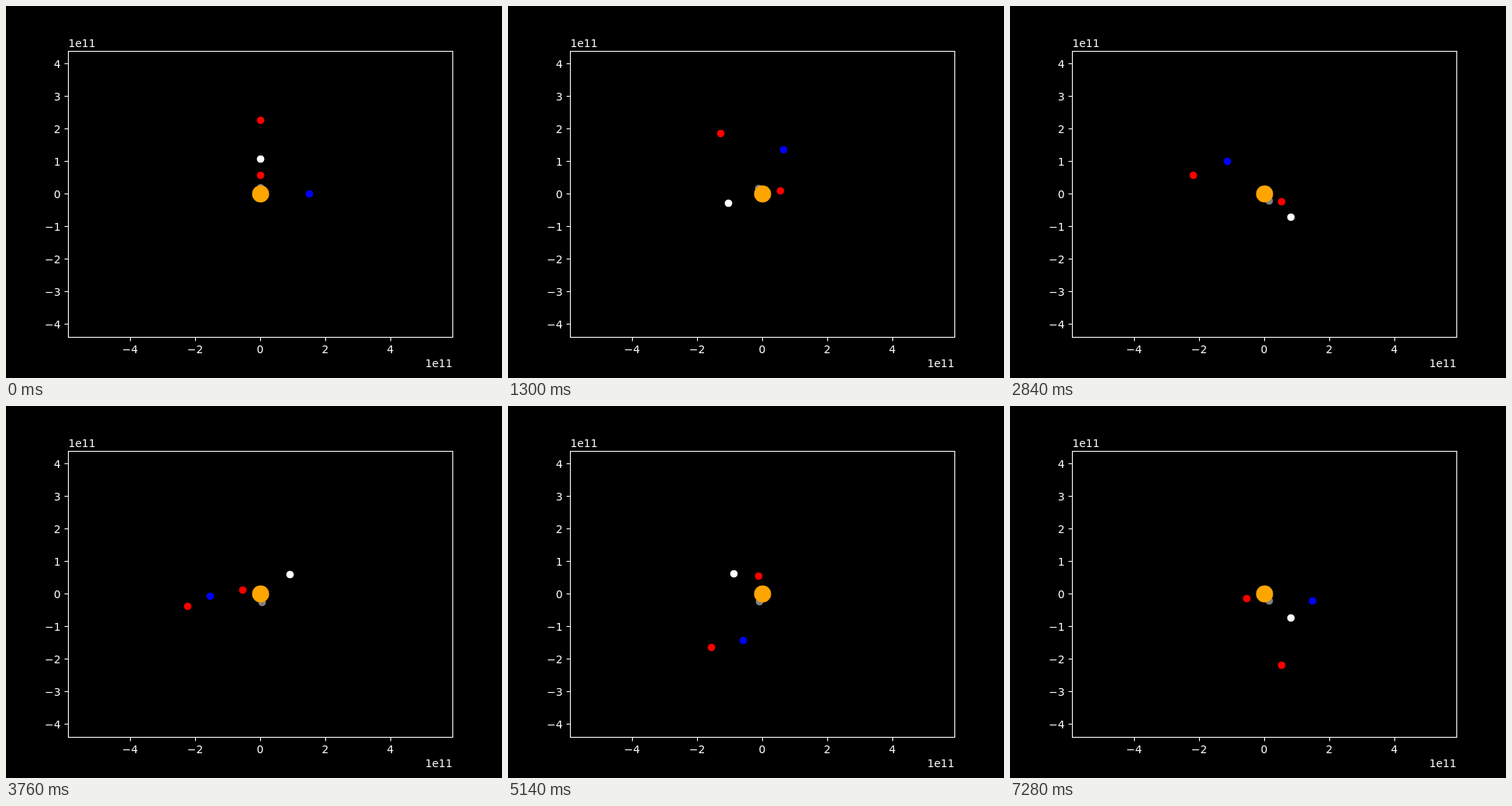
Write an HTML page with a canvas that moves like this. It is 640 px wide and 480 px high and loops after 7.3 s.

```html
<!DOCTYPE html>
<html lang="en">
<head>
<meta charset="utf-8">
<title>Orbits</title>
<style>
  html, body { margin: 0; height: 100%; overflow: hidden; background: #000; }
  canvas { display: block; }
</style>
</head>
<body>
<canvas id="stage" width="640" height="480"></canvas>
<script>
const ctx = document.getElementById('stage').getContext('2d');
const SUN = { x: 328, y: 242.4 };
const UNIT = 42;          // pixels per 1e11 metres
const DAY = 20, DAYS = 365;
const RAD = Math.PI / 180;

// a: semi-major axis in px, e: eccentricity (negative starts at the far point),
// rate: mean degrees per day, start: initial direction in degrees
const planets = [
  { color: 'gray',  a: 9.8,  e: 0.1,    rate: -16.205, start: 90 },
  { color: 'red',   a: 23.7, e: -0.027, rate: 4.252,   start: 90 },
  { color: 'white', a: 45.4, e: 0,      rate: 1.6155,  start: 90 },
  { color: 'blue',  a: 63.8, e: 0.014,  rate: 360 / 372, start: 0 },
  { color: 'red',   a: 94.9, e: -0.004, rate: 0.5308,  start: 90 }
];

const snap = v => Math.floor(v + 0.5) + 0.5;

function line(x1, y1, x2, y2) {
  ctx.beginPath();
  ctx.moveTo(x1, y1);
  ctx.lineTo(x2, y2);
  ctx.stroke();
}

function dot(x, y, r, color) {
  ctx.fillStyle = color;
  ctx.beginPath();
  ctx.arc(snap(x), snap(y), r, 0, 2 * Math.PI);
  ctx.fill();
}

function label(text, x, y, align) {
  ctx.textAlign = align;
  ctx.fillText(text, x, y);
}

function drawAxes() {
  ctx.strokeStyle = ctx.fillStyle = '#fff';
  ctx.lineWidth = 1.11;
  ctx.font = '13.89px "DejaVu Sans", sans-serif';
  ctx.strokeRect(80.5, 58.5, 496, 369);
  const name = n => String(n).replace('-', '\u2212');
  for (let n = -4; n <= 4; n++) {
    const y = snap(SUN.y - n * UNIT);
    line(75.5, y, 80.5, y);
    label(name(n), 70.5, y + 5, 'right');
    if (n % 2 === 0) {
      const x = snap(SUN.x + n * UNIT);
      line(x, 427.5, x, 432.5);
      label(name(n), x - 0.5, 448, 'center');
    }
  }
  label('1e11', 80.5, 53, 'left');
  label('1e11', 576, 466, 'right');
}

function drawPlanet({ color, a, e, rate, start }, day) {
  const m = Math.abs(rate) * day * RAD;
  const turn = m + 2 * e * Math.sin(m) + 1.25 * e * e * Math.sin(2 * m);
  const r = a * (1 - e * e) / (1 + e * Math.cos(turn));
  const angle = start * RAD + Math.sign(rate) * turn;
  dot(SUN.x + r * Math.cos(angle), SUN.y - r * Math.sin(angle), 4.86, color);
}

function draw(now) {
  const day = Math.floor(now / DAY) % DAYS;
  ctx.fillStyle = '#000';
  ctx.fillRect(0, 0, 640, 480);
  for (const p of planets) drawPlanet(p, day);
  dot(SUN.x, SUN.y, 11, 'orange');
  drawAxes();
}

const origin = performance.now();
function tick() {
  draw(performance.now() - origin);
  requestAnimationFrame(tick);
}
tick();
</script>
</body>
</html>
```
